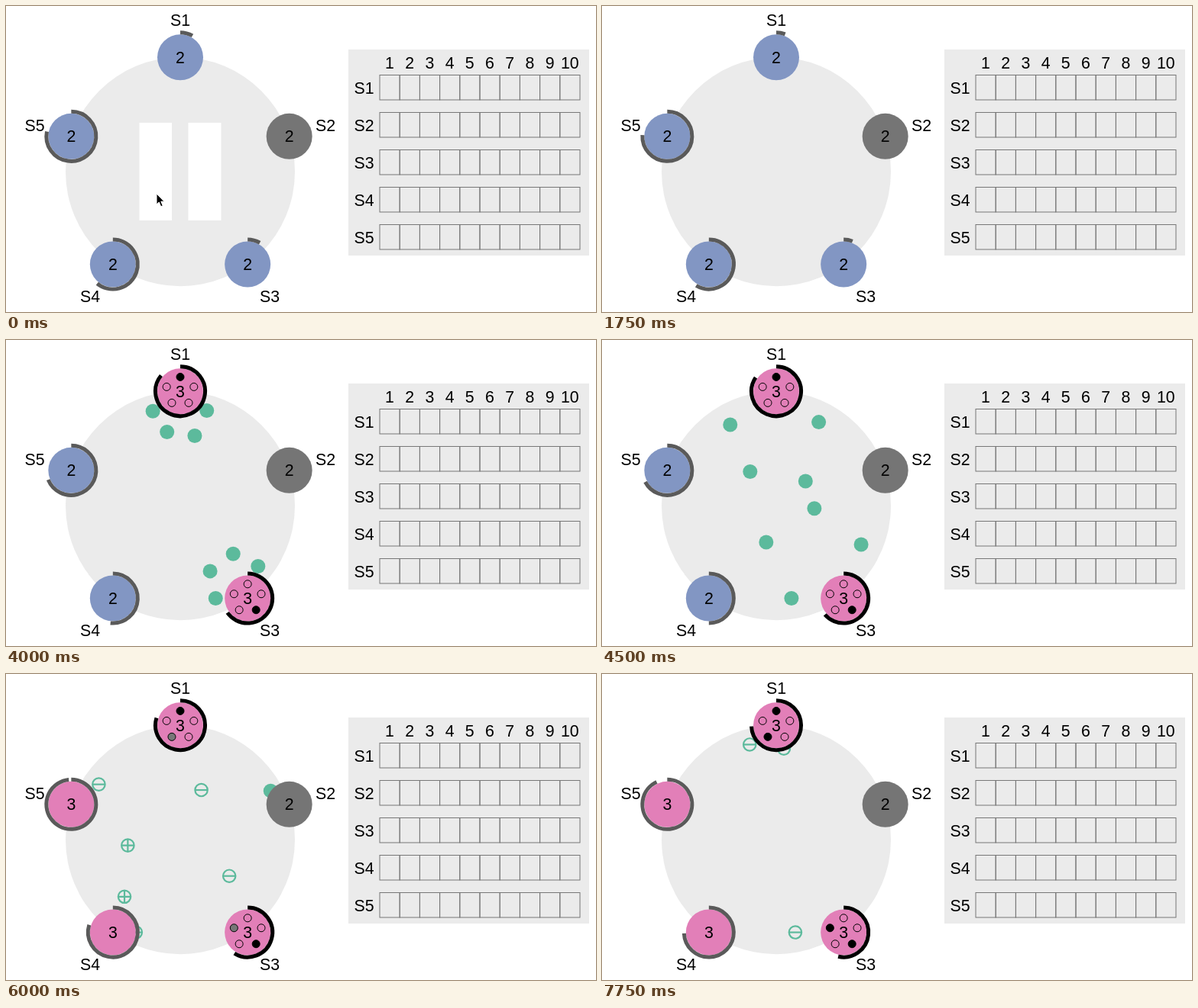
These frames come from a looping animation (772x401 px, 8 s). An HTML page:

```html
<!DOCTYPE html>
<html lang="en">
<head>
<meta charset="utf-8">
<title>Leader election</title>
<style>
  html, body { margin: 0; width: 100%; height: 100%; overflow: hidden; background: #fff; }
  svg { display: block; width: 772px; height: 401px; }
  text { font: 21.3px "Liberation Sans", Helvetica, Arial, sans-serif; text-anchor: middle; fill: #000; }
</style>
</head>
<body>
<svg viewBox="0 0 772 401">
  <g id="board"></g>
  <g id="scene"></g>
</svg>
<script>
const LOOP = 8000, STEP = 250, PAUSED_STEPS = 4;
const CENTER = { x: 228, y: 217.2 }, RING = 150, SERVER = 30, MESSAGE = 9.5;
const BLUE = '#8296c3', PINK = '#e27fb8', GREEN = '#5cba9c', PANEL = '#ebebeb';
const SWEEP = 2.8; // timer degrees lost per step
const ELECTION = 11;

const polar = (c, r, deg) => {
  const a = deg * Math.PI / 180;
  return { x: c.x + r * Math.sin(a), y: c.y - r * Math.cos(a) };
};
const text = (x, y, s) => `<text x="${x}" y="${y + 7.6}">${s}</text>`;
const rect = (x, y, w, h, fill, extra = '') =>
  `<rect x="${x}" y="${y}" width="${w}" height="${h}" fill="${fill}" ${extra}/>`;
const circle = (p, r, fill, extra = '') =>
  `<circle cx="${p.x}" cy="${p.y}" r="${r}" fill="${fill}" ${extra}/>`;

// timer: degrees left at step 0; then the step of the term change and the new timer
const servers = [
  { label: [228, 18], timer: 29.4, change: ELECTION, next: 343.2, candidate: true },
  { label: [418, 156], stopped: true },
  { label: [345, 380], timer: 29.4, change: ELECTION, next: 268.2, candidate: true },
  { label: [110, 380], timer: 219.2, change: 19.3, next: 343.4 },
  { label: [37.5, 156], timer: 281.4, change: 18.05, next: 410.4 }
].map((s, i) => ({ ...s, ...polar(CENTER, RING, 72 * i) }));

// [from, to, departure step, share of the way per step]
const requests = [
  [0, 1, 11, .111], [0, 2, 11, .139], [0, 3, 11.05, .1213], [0, 4, 11.05, .1295],
  [2, 0, 11, .139], [2, 1, 11.05, .1287], [2, 3, 11.1, .1135], [2, 4, 11.05, .1433]
];
const replies = [
  [2, 0, 18.1, .1113], [0, 2, 18.2, .146], [4, 0, 18.85, .109], [3, 2, 20, .102],
  [4, 2, 18.05, .14, true], [3, 0, 19.35, .1308, true]
];

const progress = (m, n) => (n - m[2]) * m[3];

function place([from, to], f) {
  const a = servers[from], b = servers[to];
  const edge = SERVER / Math.hypot(b.x - a.x, b.y - a.y);
  const k = edge + Math.max(0, f) * (1 - 2 * edge);
  return { x: a.x + (b.x - a.x) * k, y: a.y + (b.y - a.y) * k };
}

function drawMessages(n) {
  let out = '';
  for (const m of requests) {
    const f = progress(m, n);
    if (n >= ELECTION && f < 1) out += circle(place(m, f), MESSAGE, GREEN);
  }
  for (const m of replies) {
    const f = progress(m, n), r = 8.2;
    if (f < 0 || f >= 1) continue;
    const p = place(m, f);
    const upright = m[4] ? `M${p.x} ${p.y - r}v${2 * r}` : '';
    out += circle(p, r, 'none', `stroke="${GREEN}" stroke-width="2.2"`) +
      `<path d="M${p.x - r} ${p.y}h${2 * r}${upright}" stroke="${GREEN}" stroke-width="2.2"/>`;
  }
  return out;
}

function voteColor(owner, voter, n) {
  if (owner === voter) return '#000';
  const vote = replies.find(m => m[4] && m[0] === voter && m[1] === owner);
  const f = vote ? progress(vote, n) : -1;
  return f >= 1 ? '#000' : f >= 0 ? '#777' : 'none';
}

function drawServer(s, i, n) {
  const changed = n >= s.change;
  const running = changed && s.candidate;
  let out = circle(s, SERVER, s.stopped ? '#757575' : changed ? PINK : BLUE);
  if (!s.stopped) {
    const angle = (changed ? s.next : s.timer) - SWEEP * n;
    const r = SERVER + 2.5, a = polar(s, r, 0), b = polar(s, r, angle);
    out += `<path d="M${a.x} ${a.y}A${r} ${r} 0 ${+(angle > 180)} 1 ${b.x} ${b.y}"
      fill="none" stroke="${running ? '#000' : '#5a5a5a'}" stroke-width="5"/>`;
  }
  if (running) servers.forEach((_, v) => {
    out += circle(polar(s, 18.75, 72 * v), 5, voteColor(i, v, n), 'stroke="#000"');
  });
  return out + text(s.x, s.y, changed ? 3 : 2);
}

function drawOverlay(step) {
  let out = '';
  if (step <= PAUSED_STEPS)
    out += rect(174.5, 153, 42.5, 128, '#fff') + rect(238.5, 153, 43, 128, '#fff');
  const tip = [[197, 246], [217, 224], [120, 350]][step];
  if (tip) out += `<path transform="translate(${tip})" d="M0 0V14L3.3 11L5.7 16.8L8.2 15.7L5.8 10.2H10Z"
    fill="#000" stroke="#fff"/>`;
  return out;
}

function drawBoard() {
  let out = circle(CENTER, RING, PANEL) + rect(448, 57, 315, 270, PANEL);
  for (let c = 0; c < 10; c++) out += text(502 + 26.2 * c, 74, c + 1);
  servers.forEach((s, i) => {
    const y = 90.5 + 49 * i;
    out += text(...s.label, 'S' + (i + 1)) + text(468.5, y + 16.5, 'S' + (i + 1));
    for (let c = 0; c < 10; c++)
      out += rect(489 + 26.2 * c, y, 26.2, 32.5, 'none', 'stroke="#777"');
  });
  return out;
}

const scene = document.getElementById('scene');
document.getElementById('board').innerHTML = drawBoard();

function render(time) {
  const step = Math.floor((time % LOOP) / STEP);
  const n = Math.max(0, step - PAUSED_STEPS);
  scene.innerHTML = drawOverlay(step) + drawMessages(n) +
    servers.map((s, i) => drawServer(s, i, n)).join('');
}

let start, shown;
function tick(now) {
  start ??= now;
  const step = Math.floor((now - start) / STEP);
  if (step !== shown) render(now - start);
  shown = step;
  requestAnimationFrame(tick);
}
render(0);
requestAnimationFrame(tick);
</script>
</body>
</html>
```
